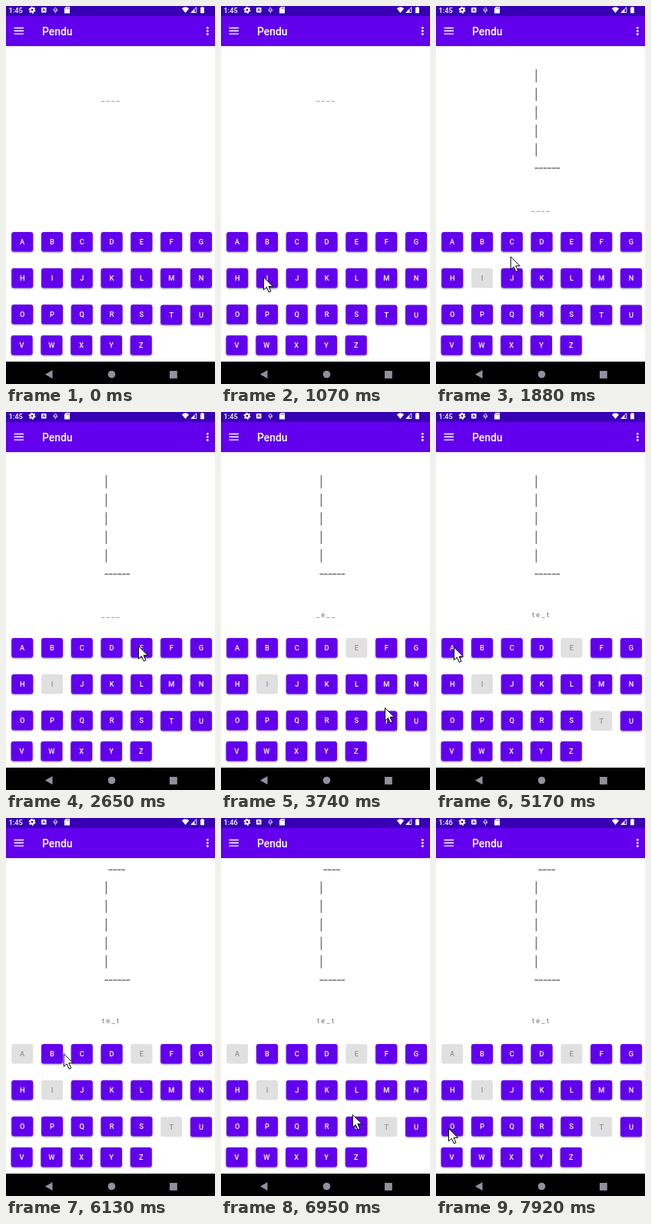
Animation of 272 by 490 pixels, one loop 8 s. Source, as an HTML page:

```html
<!DOCTYPE html>
<html lang="fr">
<head>
<meta charset="utf-8">
<title>Pendu</title>
<style>
html, body { margin: 0; width: 100%; height: 100%; overflow: hidden; background: #fff; }
svg { display: block; width: 100%; height: 100%; font-family: Roboto, sans-serif; }
text { white-space: pre; }
.key rect { fill: #6200ee; filter: drop-shadow(0 1px 1px rgba(0,0,0,.4)); }
.key text { fill: #fff; font-size: 9.26px; font-weight: 500; text-anchor: middle; }
.key.off rect { fill: #e0e0e0; filter: none; }
.key.off text { fill: #929292; }
.gallows { fill: #757575; font-size: 20.3px; }
#word { fill: #757575; font-size: 9.26px; text-anchor: middle; }
</style>
</head>
<body>
<svg viewBox="0 0 272 490" preserveAspectRatio="none">
  <rect width="272" height="490" fill="#fff"/>
  <rect width="272" height="52" fill="#6200ee"/>
  <rect width="272" height="13" fill="#3700b3"/>

  <!-- status bar -->
  <g fill="#fff">
    <text id="clock" x="3.5" y="8.8" font-size="9.3" font-weight="500"></text>
    <circle cx="34" cy="5.2" r="2.4" fill="none" stroke="#fff" stroke-width="2"/>
    <circle cx="34" cy="5.2" r="3.9" fill="none" stroke="#fff" stroke-width="1.2" stroke-dasharray="2.04"/>
    <rect x="46" y="2" width="6.5" height="6.5" rx=".8"/>
    <text x="49.2" y="7.4" font-size="6" font-weight="700" text-anchor="middle" fill="#3700b3">A</text>
    <g fill="none" stroke="#d8ccf3" stroke-width="1">
      <ellipse cx="64.3" cy="4.2" rx="1.3" ry="2"/>
      <path d="M61.7 4.3a2.6 3 0 0 0 5.2 0M64.3 7.3v2"/>
    </g>
    <path d="M78 1h5v8.4h-7V3z"/>
    <path d="M79 2v1.6M80.4 2v1.6M81.8 2v1.6" stroke="#3700b3" stroke-width=".6"/>
    <path d="M228.8 3.2Q233.500 -.6 238.200 3.200L233.500 9z"/>
    <path d="M247.800 1.700V8.500H240.800z" fill="none" stroke="#fff" stroke-width=".9"/>
    <path d="M245.500 4v4.500h-4.500z"/>
    <path d="M254.500 1h2v.8h1.400v7.500h-4.800V1.800h1.400z"/>
  </g>

  <!-- app bar -->
  <path d="M10.500 28.500h12.500M10.500 32.300h12.500M10.500 36.100h12.500" stroke="#fff" stroke-width="1.400"/>
  <text x="47" y="37.700" font-size="13.900" font-weight="500" fill="#fff">Pendu</text>
  <g fill="#fff">
    <circle cx="262.300" cy="28.300" r="1.400"/>
    <circle cx="262.300" cy="32.400" r="1.400"/>
    <circle cx="262.300" cy="36.500" r="1.400"/>
  </g>

  <g id="pole" class="gallows"></g>
  <text id="beam" class="gallows" x="133" y="72.600">----</text>
  <text id="word" x="136"></text>
  <g id="keys"></g>

  <!-- navigation bar -->
  <rect y="461" width="272" height="29" fill="#000"/>
  <g fill="#948e9f">
    <path d="M51 477.500L60.500 472v11z"/>
    <circle cx="137.500" cy="477.500" r="4.800"/>
    <rect x="213" y="473" width="9.800" height="9.800"/>
  </g>

  <clipPath id="keyClip"><rect id="keyBox" width="28" height="26" rx="3"/></clipPath>
  <g clip-path="url(#keyClip)"><circle id="ripple" fill="#fff"/></g>

  <g id="cursor">
    <g id="ring" fill="none">
      <circle r="11" stroke="#000"/>
      <circle r="10" stroke="#fff"/>
    </g>
    <path d="M.5 .5V17l3.900-3.600 2.900 6.600 2.700-1.200-2.900-6.400h5.400z" fill="#fff" stroke="#000" stroke-width="1"/>
  </g>
</svg>
<script>
const LOOP = 8000;
const $ = id => document.getElementById(id);

function add(parent, tag, attrs, text = '') {
  const el = document.createElementNS('http://www.w3.org/2000/svg', tag);
  for (const name in attrs) el.setAttribute(name, attrs[name]);
  el.textContent = text;
  return parent.appendChild(el);
}

const rowTops = [293, 340, 387, 427];
const keys = {};
[...'ABCDEFGHIJKLMNOPQRSTUVWXYZ'].forEach((letter, i) => {
  const row = Math.floor(i / 7);
  const x = (row === 3 ? 6.6 : 7.2) + i % 7 * 38.8;
  const y = rowTops[row] + (letter === 'T' || letter === 'U' ? .6 : 0);
  const el = add($('keys'), 'g', { class: 'key' });
  add(el, 'rect', { x, y, width: 28, height: 25.6, rx: 3 });
  add(el, 'text', { x: x + 14, y: y + 16.3 }, letter);
  keys[letter] = { el, x, y };
});

for (let i = 0; i < 5; i++) add($('pole'), 'text', { x: 128, y: 96.5 + i * 24 }, '|');
add($('pole'), 'text', { x: 128, y: 215.5 }, '------');

// Mouse button down and up, then the moment the app reacts.
const presses = [
  { letter: 'I', down: 970, up: 1070, react: 1330 },
  { letter: 'E', down: 2800, up: 2900, react: 3170 },
  { letter: 'T', down: 4040, up: 4150, react: 4400 },
  { letter: 'A', down: 5320, up: 5370, react: 5660 },
  { letter: 'O', down: 7830, up: 7920, react: Infinity }
];
const DISABLE_DELAY = 50;
const CURSOR_START = 350;
const MINUTE_CHANGE = 6600;

// time, x, y of the pointer tip
const path = [
  [350, 197, 447], [650, 115, 395], [930, 55, 351], [1600, 55, 351],
  [1850, 95, 328], [2030, 94, 307], [2130, 101, 306], [2620, 172, 303],
  [3350, 172, 303], [3580, 200, 347], [3740, 213, 383], [3930, 214, 396],
  [4550, 214, 396], [4800, 125, 353], [5130, 23, 304.5], [5700, 23, 304.5],
  [5880, 71, 305], [6080, 71, 305], [6230, 85, 306], [6380, 85, 306],
  [6700, 200, 352], [6950, 171, 384], [7150, 101, 405], [7650, 16, 402],
  [LOOP, 16, 402]
];

// Velocity is zero wherever the pointer rests.
function slope(i, axis) {
  const a = path[i - 1], b = path[i], c = path[i + 1];
  const same = (p, q) => p[1] === q[1] && p[2] === q[2];
  if (!a || !c || same(a, b) || same(b, c)) return 0;
  return (c[axis] - a[axis]) / (c[0] - a[0]);
}

function pointerAt(t) {
  const next = path.findIndex(p => p[0] > t);
  if (next < 1) return path[0].slice(1);
  const a = path[next - 1], b = path[next];
  const span = b[0] - a[0], u = (t - a[0]) / span;
  return [1, 2].map(axis =>
    a[axis] + (b[axis] - a[axis]) * u * u * (3 - 2 * u) +
    span * u * (1 - u) * (slope(next - 1, axis) * (1 - u) - slope(next, axis) * u));
}

const show = (el, visible) => el.setAttribute('visibility', visible ? 'inherit' : 'hidden');

function drawRipple(t) {
  const press = presses.find(p => t >= p.react && t < p.react + 250);
  show($('ripple'), press);
  if (!press) return;
  const key = keys[press.letter], age = t - press.react;
  const [x, y] = pointerAt(press.up);
  $('keyBox').setAttribute('x', key.x);
  $('keyBox').setAttribute('y', key.y);
  $('ripple').setAttribute('cx', x);
  $('ripple').setAttribute('cy', y);
  $('ripple').setAttribute('r', 8 + age / 8);
  $('ripple').setAttribute('opacity', .24 * (1 - age / 250));
}

function draw(t) {
  const used = {};
  for (const { letter, react } of presses) {
    used[letter] = t >= react + DISABLE_DELAY;
    keys[letter].el.classList.toggle('off', used[letter]);
  }
  $('clock').textContent = t < MINUTE_CHANGE ? '1:45' : '1:46';
  show($('pole'), used.I);
  show($('beam'), used.A);
  $('word').setAttribute('y', used.I ? 266 : 123);
  $('word').textContent = [...'test'].map(c => used[c.toUpperCase()] ? c : '_').join(' ');
  drawRipple(t);

  show($('cursor'), t >= CURSOR_START);
  $('cursor').setAttribute('transform', `translate(${pointerAt(t)})`);
  show($('ring'), presses.some(p => t >= p.down && t < p.up));
}

function frame() {
  draw(performance.now() % LOOP);
  requestAnimationFrame(frame);
}
frame();
</script>
</body>
</html>
```
